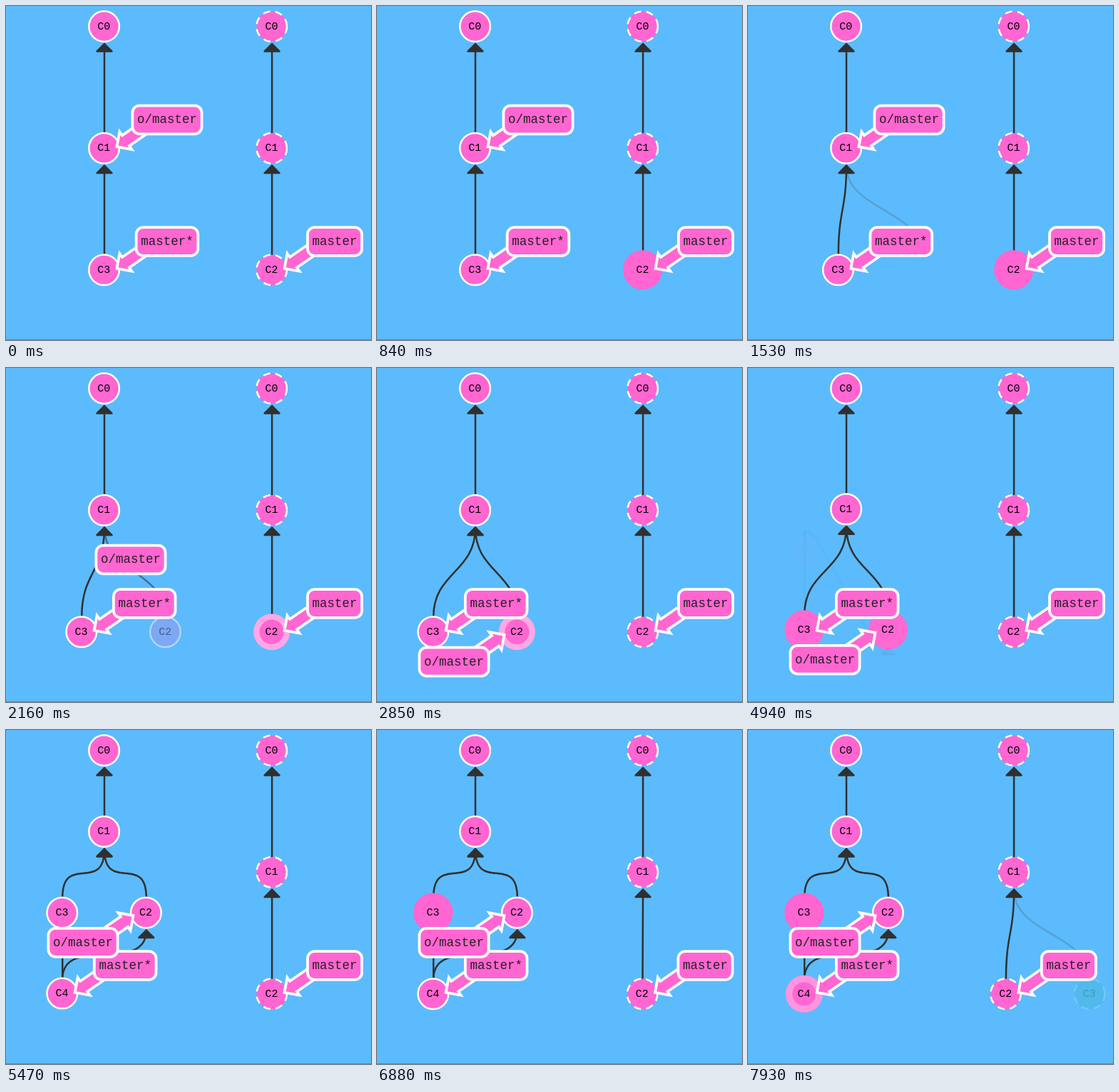
Animation, 512 px wide and 468 px high, one loop 8000 ms. Source, as an HTML page with a canvas:

```html
<!DOCTYPE html>
<html>
<head>
<meta charset="utf-8">
<style>
html, body { margin: 0; width: 100%; height: 100%; overflow: hidden; background: #5cbbfc; }
canvas { display: block; width: 512px; height: 468px; }
</style>
</head>
<body>
<canvas id="stage"></canvas>
<script>
const W = 512, H = 468, LOOP = 8000;
const PINK = [255, 102, 209], WHITE = [255, 255, 255], TEAL = [32, 176, 160], BLUE = [98, 180, 248];
const INK = '#303030', FONT = '"Liberation Mono", "Courier New", monospace';
const LEFT = 137.6, RIGHT = 372.7, ROW = [28.6, 199.2, 369.8];
const R = 21.3, SPREAD = 58.8, PARTIAL = 0.19;
const MOVE = 400, BOUNCE = 780;

const canvas = document.getElementById('stage');
const ctx = canvas.getContext('2d');
const dpr = window.devicePixelRatio || 1;
canvas.width = W * dpr;
canvas.height = H * dpr;

const clamp = v => Math.min(1, Math.max(0, v));
const lerp = (a, b, p) => a + (b - a) * p;
const mix = (a, b, p) => `rgb(${a.map((v, i) => Math.round(lerp(v, b[i], p))).join(',')})`;
const rgb = c => mix(c, c, 0);
const ease = (t, start, time) => (1 - Math.cos(Math.PI * clamp((t - start) / time))) / 2;

function bounce(t, start) {
  const n = clamp((t - start) / BOUNCE), k = 7.5625, d = 2.75;
  if (n < 1 / d) return k * n * n;
  if (n < 2 / d) return k * (n - 1.5 / d) ** 2 + 0.75;
  if (n < 2.5 / d) return k * (n - 2.25 / d) ** 2 + 0.9375;
  return k * (n - 2.625 / d) ** 2 + 0.984375;
}

const highlight = (t, start) => ease(t, start, 528);

function edge(tail, head, alpha = 1) {
  if (alpha <= 0) return;
  const shift = 0.4, x0 = tail.x + shift, x1 = head.x + shift;
  const y0 = tail.y - R, y1 = head.y + R * 1.15, bend = 62.5, a = 10.4;
  ctx.globalAlpha = alpha;
  ctx.strokeStyle = ctx.fillStyle = INK;
  ctx.lineWidth = 2.5;
  ctx.lineJoin = ctx.lineCap = 'round';
  ctx.beginPath();
  ctx.moveTo(x0, y0);
  ctx.bezierCurveTo(x0, y0 - bend, x1, y1 + bend, x1, y1);
  ctx.stroke();
  ctx.beginPath();
  ctx.moveTo(x1, y1);
  ctx.lineTo(x1 - a, y1 + a);
  ctx.lineTo(x1 + a, y1 + a);
  ctx.closePath();
  ctx.fill();
  ctx.stroke();
  ctx.globalAlpha = 1;
}

function node(name, pos, { glow = 0, dashed = false, alpha = 1, fill = rgb(PINK) } = {}) {
  if (alpha <= 0) return;
  ctx.globalAlpha = alpha;
  ctx.beginPath();
  ctx.arc(pos.x, pos.y, R, 0, Math.PI * 2);
  ctx.fillStyle = fill;
  ctx.fill();
  ctx.lineCap = 'butt';
  ctx.lineWidth = lerp(2.5, 12.6, glow);
  ctx.strokeStyle = mix(WHITE, PINK, glow);
  ctx.setLineDash(dashed && glow === 0 ? [10, 7.5] : []);
  ctx.stroke();
  ctx.setLineDash([]);
  ctx.fillStyle = '#000';
  ctx.font = `15px ${FONT}`;
  ctx.fillText(name, pos.x - 0.3, pos.y + 4);
  ctx.globalAlpha = 1;
}

// side: 1 puts the tag up and right of the commit, -1 down and left
function tag(name, pos, side = 1) {
  const head = 15.1, shaft = 8.8, end = 45;
  const points = [[0, 0], [head, -head], [head, -shaft], [end, -shaft],
                  [end, shaft], [head, shaft], [head, head]];
  const c = Math.cos(-0.602), s = Math.sin(-0.602);
  ctx.fillStyle = rgb(PINK);
  ctx.strokeStyle = '#fff';
  ctx.lineWidth = 3.75;
  ctx.lineJoin = 'miter';
  ctx.beginPath();
  for (const [u, v] of points) {
    ctx.lineTo(pos.x + side * (17.9 + u * c - v * s), pos.y + 1 + side * (-3 + u * s + v * c));
  }
  ctx.closePath();
  ctx.fill();
  ctx.stroke();

  const x = pos.x + 88.4 * side, y = pos.y + 1 - 40.8 * side;
  const w = name.length * 10.5 + 13.2, h = 39.8;
  ctx.beginPath();
  ctx.roundRect(x - w / 2, y - h / 2, w, h, 10);
  ctx.fill();
  ctx.stroke();
  ctx.fillStyle = '#222';
  ctx.font = `17.5px ${FONT}`;
  ctx.fillText(name, x, y + 5);
}

function drawLocal(t) {
  const grow = ease(t, 1110, MOVE), born = bounce(t, 1110);
  const settle = ease(t, 1960, 440);
  const merge = ease(t, 4900, MOVE), mergeBorn = bounce(t, 4900);
  const rest = 1 - PARTIAL, far = SPREAD * (2 - PARTIAL);
  const lift = (ROW[2] - ROW[1]) * 2 / 3 * merge;

  const c0 = { x: LEFT, y: ROW[0] };
  const c1 = { x: LEFT, y: ROW[1] - lift / 2 };
  const c3 = { x: LEFT - SPREAD * (PARTIAL * grow + rest * settle), y: ROW[2] - lift };
  const fetched = p => ({
    x: LEFT + far * p - SPREAD * rest * settle,
    y: lerp(ROW[1], ROW[2], p) - lift
  });
  const c2 = fetched(born);
  const merged = p => ({ x: c3.x, y: lerp(256.1, ROW[2], p) });
  const c4 = merged(mergeBorn);

  edge(c1, c0);
  edge(c3, c1);
  edge(fetched(grow), c1, PARTIAL * grow + rest * settle);
  edge(merged(merge), c3, merge);
  edge(merged(merge), c2, merge);

  node('C4', c4, { alpha: mergeBorn, glow: highlight(t, 7600) });
  node('C2', c2, {
    alpha: 0.04 * born + 0.96 * settle,
    fill: mix(BLUE, PINK, settle),
    glow: highlight(t, 2565) * (1 - merge)
  });
  node('C3', c3, { glow: t < 5600 ? highlight(t, 3405) * (1 - merge) : highlight(t, 5960) });
  node('C1', c1);
  node('C0', c0);

  tag('master*', { x: c3.x, y: ROW[2] });
  tag('o/master', {
    x: lerp(LEFT, LEFT + SPREAD, settle),
    y: lerp(ROW[1], ROW[2], settle) - lift
  }, 1 - 2 * settle);
}

function drawRemote(t) {
  const grow = ease(t, 6825, MOVE), born = bounce(t, 6825);
  const c0 = { x: RIGHT, y: ROW[0] };
  const c1 = { x: RIGHT, y: ROW[1] };
  const c2 = { x: RIGHT - SPREAD * PARTIAL * grow, y: ROW[2] };
  const pushed = p => ({ x: RIGHT + SPREAD * (2 - PARTIAL) * p, y: lerp(ROW[1], ROW[2], p) });

  edge(c1, c0);
  edge(c2, c1);
  edge(pushed(grow), c1, PARTIAL * grow);

  node('C3', pushed(born), { dashed: true, alpha: PARTIAL * born, fill: rgb(TEAL) });
  node('C2', c2, { dashed: true, glow: highlight(t, 320) * (1 - ease(t, 1960, 440)) });
  node('C1', c1, { dashed: true });
  node('C0', c0, { dashed: true });
  tag('master', c2);
}

function frame() {
  const t = performance.now() % LOOP;
  ctx.setTransform(dpr, 0, 0, dpr, 0, 0);
  ctx.textAlign = 'center';
  ctx.fillStyle = '#5cbbfc';
  ctx.fillRect(0, 0, W, H);
  ctx.fillStyle = '#4a8fc0';
  ctx.fillRect(0, H - 1, W, 1);
  drawLocal(t);
  drawRemote(t);
  requestAnimationFrame(frame);
}
frame();
</script>
</body>
</html>
```
